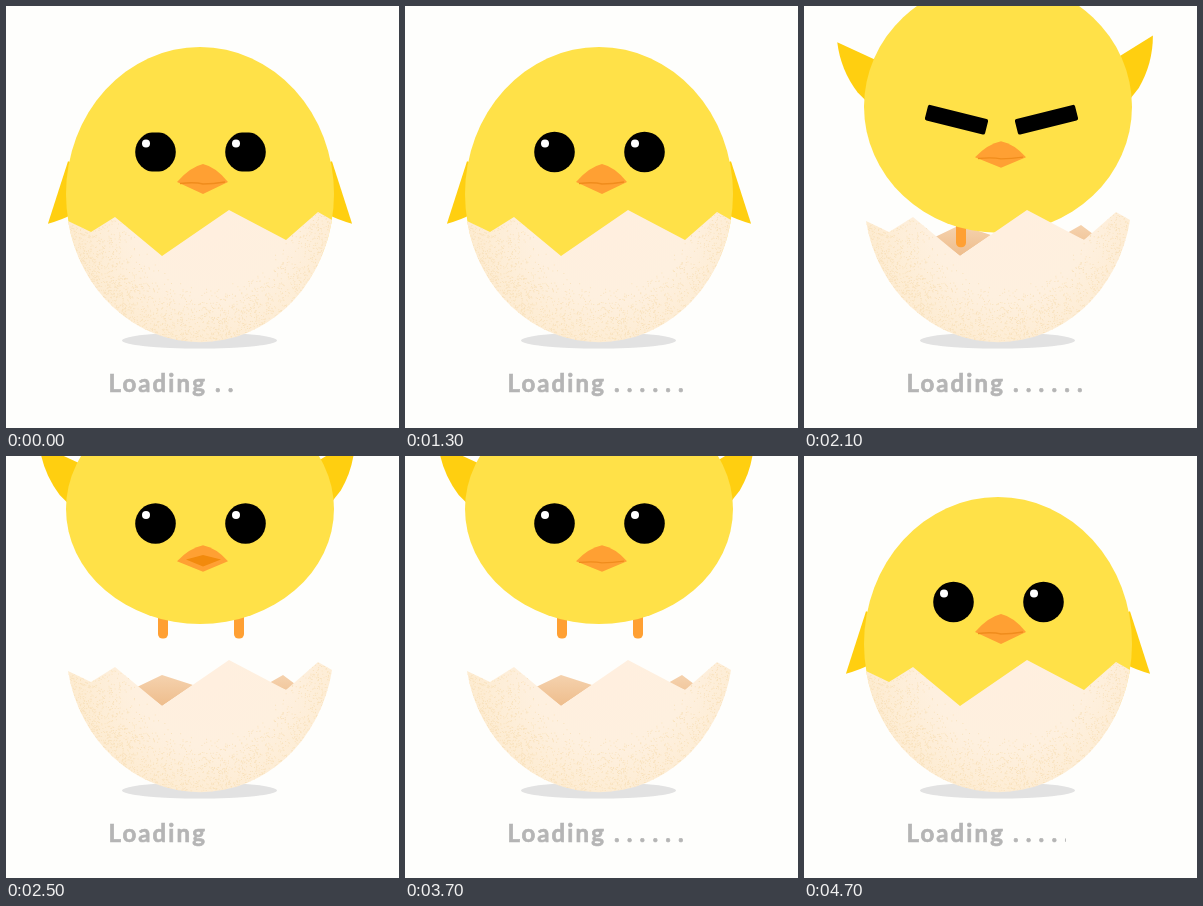
Recreate the animation shown at these times as an HTML page with a canvas. Size 393 by 422 pixels, loop 4.8 s.

```html
<!DOCTYPE html>
<html lang="en">
<head>
<meta charset="utf-8">
<title>Loading</title>
<style>
html, body { margin: 0; width: 100%; height: 100%; overflow: hidden; background: #fefefc; }
canvas { display: block; }
</style>
</head>
<body>
<canvas id="stage" width="393" height="422"></canvas>
<script>
const ctx = document.getElementById('stage').getContext('2d');
const LOOP = 4800, STEP = 100, FLAP = 400, MID = 194;
const DOT_STARTS = [-180, 760, 2500, 3940, 4320];

const wing = new Path2D('M72 0L8-15 0 30 25 27Q52 20 72 0Z');
const shell = new Path2D('M62 215L85 226 109 211 156 250 223 204 280 234 312 206 326 214A134 147 0 0 1 62 215Z');
const inside = new Path2D('M131 231L156 219 187 229 156 250ZM263 227L277 219 289 228 280 234Z');
const beak = new Path2D('M-26 3Q-13-12 0-15Q13-12 25 3L0 15Z');
const mouth = new Path2D('M-23 4.5Q-8 3 0 5Q10 5 22 3');
const tongue = new Path2D('M-17 1L0-4 18 1 0 9Z');

const mix = (a, b, k) => a + (b - a) * k;
const rad = deg => deg * Math.PI / 180;

function ramp(t, from, to) {
  const k = Math.min(1, Math.max(0, (t - from) / (to - from)));
  return k * k * (3 - 2 * k);
}

// Shell grain gets denser towards the rim
const grain = new Path2D();
let seed = 7;
const random = () => (seed = seed * 16807 % 2147483647) / 2147483647;
for (let i = 0; i < 9000; i++) {
  const x = 60 + random() * 268, y = 205 + random() * 130;
  const r = Math.hypot((x - 204) / 134, (y - 188) / 147);
  if (random() < (r - 0.6) * 2) grain.rect(x, y, 1, 1);
}

const shellFill = ctx.createRadialGradient(205, 220, 10, 205, 205, 150);
shellFill.addColorStop(0, '#ffefdf');
shellFill.addColorStop(0.5, '#fef0df');
shellFill.addColorStop(1, '#fdebcf');
const insideFill = ctx.createLinearGradient(0, 219, 0, 250);
insideFill.addColorStop(0, '#f5d2ae');
insideFill.addColorStop(1, '#eebd8c');

function fill(color, path) {
  ctx.fillStyle = color;
  ctx.fill(path);
}

function ellipse(color, x, y, rx, ry) {
  const path = new Path2D();
  path.ellipse(x, y, rx, ry, 0, 0, 7);
  fill(color, path);
}

function bar(color, x, y, w, h, r) {
  const path = new Path2D();
  path.roundRect(x, y, w, h, r);
  fill(color, path);
}

function place(x, y, paint) {
  ctx.save();
  ctx.translate(x, y);
  paint();
  ctx.restore();
}

// A folded wing hangs from a slightly higher and wider joint
function drawWing(side, angle, cy) {
  const fold = Math.min(0, angle) / 59;
  const lift = side > 0 ? 7 * (1 + fold) : 0;
  place(MID, cy, () => {
    ctx.scale(side, 1);
    ctx.translate(104 - 11 * fold, -20 + 12 * fold);
    ctx.rotate(-rad(angle + lift));
    fill('#ffcf10', wing);
  });
}

function drawEye(side, y, t, sway) {
  const angry = t >= 1400 && t < 2400 || t >= 3800 && t < 4400;
  place(194.5 + 45 * side, y, () => {
    if (angry) {
      const h = 13 + 3 * sway;
      ctx.translate(3, 0);
      ctx.rotate(-side * rad(11 + 3 * sway));
      bar('#000', -31, -h / 2, 62, h, 2);
      return;
    }
    const blink = Math.min(Math.abs(t - 200), Math.abs(t - 950));
    const lid = Math.min(21, Math.max(2, blink * 0.0975));
    ctx.beginPath();
    ctx.rect(-21, -lid, 42, lid * 2);
    ctx.clip();
    ellipse('#000', 0, 0, 20.3, 20.3);
    ellipse('#fff', -9.5, -8.5, 4, 4);
  });
}

function drawBeak(y, t, turn) {
  place(197, y, () => {
    ctx.scale(1, mix(1, 0.88, turn));
    fill('#ffa033', beak);
    if (t >= 2400 && t < 3700) {
      fill('#f28a0c', tongue);
    } else {
      ctx.strokeStyle = '#f08c1c';
      ctx.lineWidth = 1.5;
      ctx.stroke(mouth);
    }
  });
}

function drawChick(t) {
  const sway = Math.sin(t / FLAP * 2 * Math.PI);
  const bob = Math.cos(t / FLAP * 2 * Math.PI);
  const fly = ramp(t, 1800, 2300) - ramp(t, 4200, 4600);
  const turn = ramp(t, 1800, 2130) - ramp(t, 4250, 4600);
  const flap = ramp(t, 1300, 1400) - ramp(t, 4200, 4400);

  const cy = mix(188, 53 + 32 * bob, fly);
  const ry = mix(147, 114 + sway, fly);
  const angle = mix(-59, 13 + 25 * sway - 7 * bob, flap);
  const foot = Math.min(cy + ry + 14.5, 300);

  for (const side of [-1, 1]) {
    bar('#ffa033', 190 + 38 * side, foot - 34, 10, 34, 4.5);
    drawWing(side, angle, cy);
  }
  ellipse('#ffe148', MID, cy, 134, ry);
  for (const side of [-1, 1]) {
    drawEye(side, cy + mix(-42, 10 + 4.5 * sway, turn), t, sway);
  }
  drawBeak(cy + mix(-15, 48 + 1.5 * sway, turn), t, turn);
}

function drawShell() {
  fill(shellFill, shell);
  ctx.save();
  ctx.clip(shell);
  fill('#f9e2bd', grain);
  ctx.restore();
}

function write(text, x) {
  ctx.fillText(text, x, 386);
  ctx.strokeText(text, x, 386);
}

function drawText(t) {
  ctx.fillStyle = ctx.strokeStyle = '#b5b5b5';
  ctx.lineWidth = 0.7;
  ctx.font = '700 24px Lato, sans-serif';
  ctx.letterSpacing = '2.1px';
  write('Loading', 102.5);
  const start = DOT_STARTS.findLast(s => s <= t);
  ctx.save();
  ctx.beginPath();
  ctx.rect(205, 360, (t - start) * 0.15, 40);
  ctx.clip();
  for (let i = 0; i < 6; i++) write('.', 209 + 12.8 * i);
  ctx.restore();
}

function draw(t) {
  ctx.fillStyle = '#fefefc';
  ctx.fillRect(0, 0, 393, 422);
  ellipse('#e2e2e2', 193.5, 334.5, 77.5, 8);
  fill(insideFill, inside);
  drawChick(t);
  drawShell();
  drawText(t);
}

const begin = performance.now();
function frame() {
  const t = (performance.now() - begin) % LOOP;
  draw(Math.floor(t / STEP) * STEP);
  requestAnimationFrame(frame);
}
frame();
</script>
</body>
</html>
```
